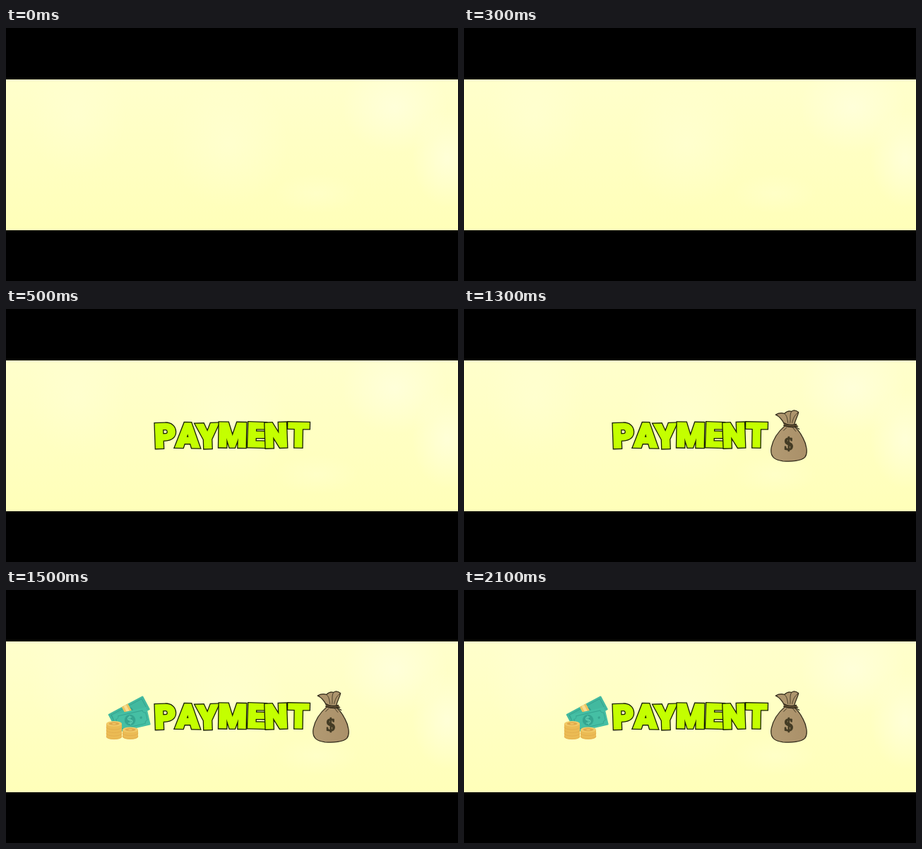
These frames come from a looping animation (640 px wide and 359 px high, 2.5 s). An HTML page:

```html
<!DOCTYPE html>
<html lang="en">
<head>
<meta charset="utf-8">
<title>Payment</title>
<style>
  html, body { margin: 0; width: 100%; height: 100%; overflow: hidden; background: #000; }
  svg { display: block; width: 100%; height: 100%; }
  .letter { font: 900 46px Roboto, "Open Sans", sans-serif; text-anchor: middle; stroke-linejoin: miter; stroke-miterlimit: 2; }
  .edge { fill: #182000; stroke: #182000; stroke-width: 5.8px; }
  .face { fill: #c4ff00; stroke: #c4ff00; stroke-width: 3.2px; }
  .sign { text-anchor: middle; }
  .ink { fill: none; stroke: #30291a; stroke-width: 1.2; stroke-linecap: round; stroke-linejoin: round; }
</style>
</head>
<body>
<svg viewBox="0 0 640 359" preserveAspectRatio="none">
  <defs>
    <linearGradient id="paper" x1="0" y1="0" x2="0" y2="1">
      <stop offset="0" stop-color="#ffffcc"/>
      <stop offset="1" stop-color="#ffffb9"/>
    </linearGradient>
    <radialGradient id="glow">
      <stop offset="0" stop-color="#ffffe2" stop-opacity=".65"/>
      <stop offset="1" stop-color="#ffffe2" stop-opacity="0"/>
    </radialGradient>
    <linearGradient id="sack" x1="0" x2="1">
      <stop offset="0" stop-color="#b29a72"/>
      <stop offset="1" stop-color="#aa9069"/>
    </linearGradient>
    <clipPath id="band"><rect y="73" width="640" height="214"/></clipPath>
  </defs>

  <rect width="640" height="359"/>
  <g clip-path="url(#band)">
    <rect y="73" width="640" height="214" fill="url(#paper)"/>
    <g fill="url(#glow)">
      <ellipse cx="550" cy="112" rx="75" ry="65"/>
      <ellipse cx="625" cy="185" rx="50" ry="70"/>
      <ellipse cx="315" cy="165" rx="85" ry="90" opacity=".5"/>
      <ellipse cx="100" cy="125" rx="70" ry="85" opacity=".4"/>
      <ellipse cx="440" cy="235" rx="60" ry="28" opacity=".4"/>
    </g>
  </g>

  <g id="cash">
    <g transform="translate(174 172.5) rotate(-28)">
      <rect x="-28" y="-10.5" width="56" height="22" rx="1" fill="#42b99f"/>
      <rect x="-24.5" y="-7.5" width="49" height="16" fill="none" stroke="#33a18e" stroke-width="1"/>
      <circle r="6.5" fill="#33a18e"/>
      <rect x="-6" y="-10.5" width="10" height="22" fill="#efc45f"/>
      <rect x="-3" y="-10.5" width="4" height="22" fill="#f8dd91"/>
    </g>
    <g transform="translate(178.5 184) rotate(-13)">
      <rect x="-25" y="-13" width="49" height="26" rx="1" fill="#45bfa4"/>
      <path d="M-18-9.5H17A4 4 0 0 0 21-5.5V5.5A4 4 0 0 0 17 9.5H-18A4 4 0 0 0-22 5.5V-5.5A4 4 0 0 0-18-9.5Z"
            fill="none" stroke="#35a590" stroke-width="1"/>
      <circle cx="-3" r="7.8" fill="#35a590"/>
      <circle cx="13" r="1.7" fill="#35a590"/>
      <text class="sign" x="-3" y="5" font-family="Lato, sans-serif" font-size="14" font-weight="700" fill="#5ccdb0">$</text>
    </g>
    <g id="coins"></g>
  </g>

  <g id="word"></g>

  <g id="bag" transform="translate(-.3 -.6)">
    <path d="M455 166C447 173 438 184 435.5 197C433 211 441 215 452 216.4C464 217.5 478 216 483 211C488 205 485 192 480 183C476 175 471 169 466 166Z"
          fill="url(#sack)"/>
    <path class="ink" d="M455 166C447 173 438 184 435.5 197C433 211 441 215 452 216.4C464 217.5 478 216 483 211C488 205 485 192 480 183C476 175 471 169 466 166"/>
    <path d="M454 164C451 158 447 153 441.5 150.5C446 148 450 147.5 454 149C457 146 460 144.5 464 146C467 143.5 470 144 474 147C473 153 469 158 468 165Z"
          fill="#ad956d"/>
    <path class="ink" d="M454 164C451 158 447 153 441.5 150.5C446 148 450 147.5 454 149C457 146 460 144.5 464 146C467 143.5 470 144 474 147C473 153 469 158 468 165"/>
    <path class="ink" style="stroke-width:.8" d="M454 149C458 152 458 157 459 162M464 146C461 151 463 156 462 162M473 148C468 151 466 157 465 162M457 169L453 173M466 169L470 174"/>
    <path d="M453 162C458 165 464 166 471 164L473 167C467 169 459 168 453 166Z" fill="#5c4c30"/>
    <path class="ink" d="M453 162C458 165 464 166 471 164M453 166C459 168 467 169 473 167M469 167L475 171"/>
    <text class="sign" x="460" y="200.3" font-family="'Liberation Serif', serif" font-size="25" font-weight="700"
          fill="#443c25" stroke="#443c25" stroke-width="1.3">$</text>
  </g>
</svg>
<script>
const LOOP = 2500;
const byId = id => document.getElementById(id);

function add(parent, tag, attrs, text = "") {
  const el = document.createElementNS("http://www.w3.org/2000/svg", tag);
  for (const key in attrs) el.setAttribute(key, attrs[key]);
  el.textContent = text;
  parent.append(el);
  return el;
}

// letter, centre x, baseline y, tilt
const letters = [
  ["P", 226, 196, -2], ["A", 257, 195.5, 1], ["Y", 286, 196.5, -2],
  ["M", 320.5, 195, 1], ["E", 354, 195, 2], ["N", 383, 195.5, -2], ["T", 414, 195, 1]
];
for (const [char, x, y, tilt] of letters) {
  const g = add(byId("word"), "g", { transform: `translate(${x} ${y}) rotate(${tilt})` });
  for (const layer of ["edge", "face"]) add(g, "text", { class: `letter ${layer}` }, char);
}

function coinStack(x, top, bottom) {
  const g = byId("coins"), rx = 11, ry = 3.8;
  const low = bottom - ry, high = top + ry;
  add(g, "path", {
    d: `M${x - rx} ${high}V${low}A${rx} ${ry} 0 0 0 ${x + rx} ${low}V${high}Z`, fill: "#ebbb54"
  });
  for (let y = high + 4.5; y < low; y += 4.5) {
    add(g, "path", {
      d: `M${x - rx} ${y}A${rx} ${ry} 0 0 0 ${x + rx} ${y}`,
      fill: "none", stroke: "#e3ad4c", "stroke-width": .8
    });
  }
  add(g, "ellipse", { cx: x, cy: high, rx, ry, fill: "#f2cb68" });
  add(g, "ellipse", { cx: x, cy: high, rx: 7.5, ry: 2.2, fill: "#e0a94c" });
  add(g, "ellipse", { cx: x, cy: high, rx: 3, ry: .9, fill: "#f2cb68" });
}
coinStack(153, 186, 212);
coinStack(176, 194.5, 212);

// each part appears at once and stays until the loop restarts
for (const [id, start] of [["word", 500], ["bag", 1000], ["cash", 1500]]) {
  const offset = start / LOOP;
  byId(id).animate([
    { opacity: 0, offset: 0 }, { opacity: 0, offset },
    { opacity: 1, offset }, { opacity: 1, offset: 1 }
  ], { duration: LOOP, iterations: Infinity });
}
</script>
</body>
</html>
```
